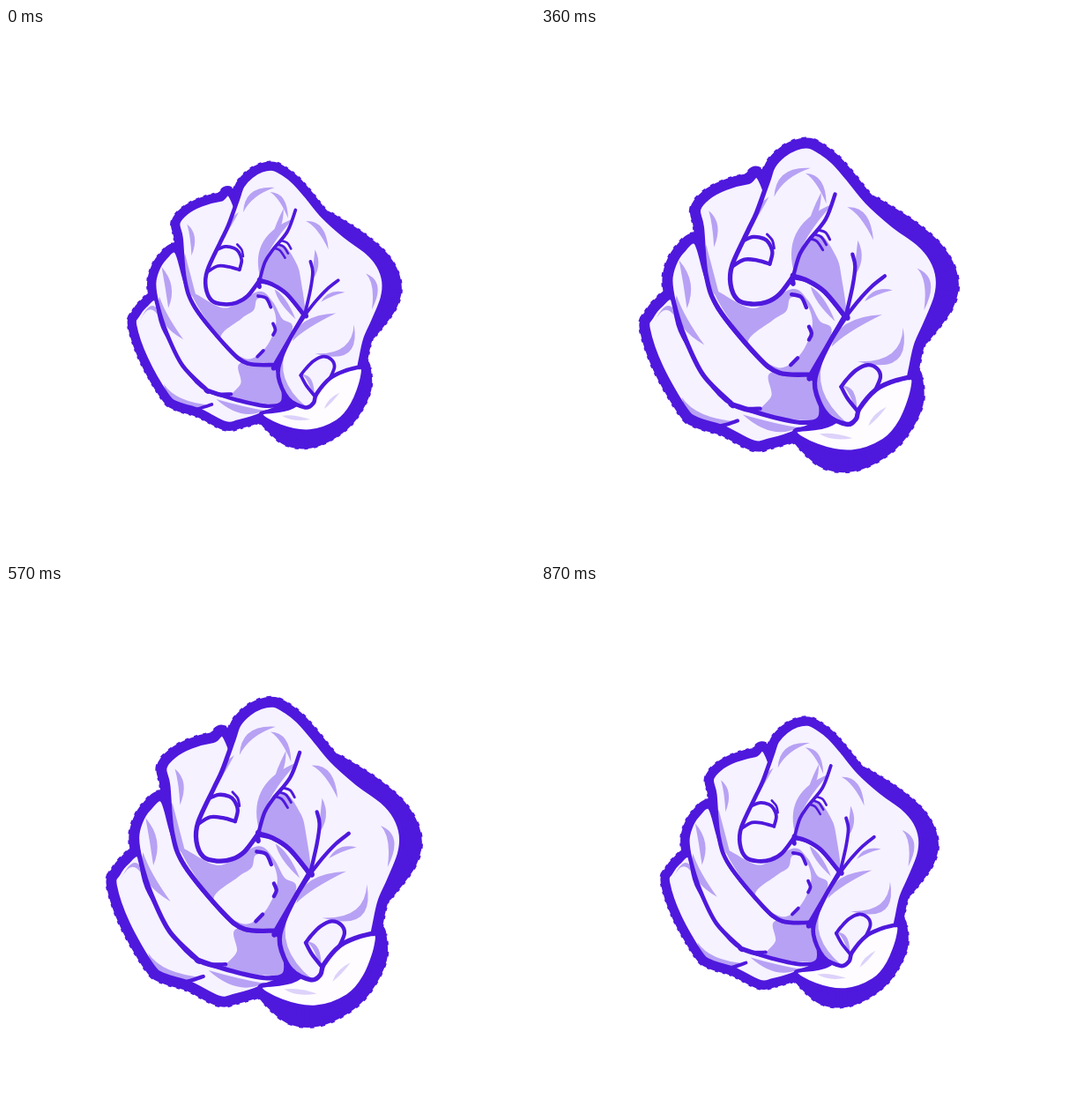
Write an HTML page with a canvas that moves like this. It is 600 px wide and 600 px high and loops after 900 ms.

```html
<!DOCTYPE html>
<html lang="en">
<head>
<meta charset="utf-8">
<title>Pulsing hand</title>
<style>
html, body { margin: 0; width: 100%; height: 100%; overflow: hidden; background: #fff; }
canvas { display: block; }
</style>
</head>
<body>
<canvas id="stage" width="600" height="600"></canvas>
<script>
const ctx = document.getElementById('stage').getContext('2d');
const INK = '#4f18dd', SKIN = '#f6f2ff', SHADE = '#b7a1f4', PALM = '#fefcff', FAINT = '#ddd2fa';
const LOOP = 900, STEP = 30, GROWTH = 0.206, DRAWN_SCALE = 1.1785;
const CENTER = { x: 297, y: 315 };

const points = text => text.trim().split(/\s+/).map(p => p.split(',').map(Number));

// Catmull-Rom spline; a doubled point makes a corner.
function curve(text, closed) {
  const p = points(text), n = p.length, path = new Path2D();
  const at = i => p[closed ? (i + n) % n : Math.max(0, Math.min(n - 1, i))];
  path.moveTo(...p[0]);
  for (let i = 0; i < (closed ? n : n - 1); i++) {
    const a = at(i - 1), b = at(i), c = at(i + 1), d = at(i + 2);
    path.bezierCurveTo(b[0] + (c[0] - a[0]) / 6, b[1] + (c[1] - a[1]) / 6,
      c[0] - (d[0] - b[0]) / 6, c[1] - (d[1] - b[1]) / 6, ...c);
  }
  return path;
}
const loop = text => curve(text, true);

// Brush mark with two sharp tips, bent through its middle point.
function leaf(text) {
  const [a, m, b] = points(text), path = new Path2D();
  const dx = (b[0] - a[0]) * 0.15, dy = (b[1] - a[1]) * 0.15;
  const cx = 2 * m[0] - (a[0] + b[0]) / 2, cy = 2 * m[1] - (a[1] + b[1]) / 2;
  path.moveTo(...a);
  path.quadraticCurveTo(cx - dy, cy + dx, ...b);
  path.quadraticCurveTo(cx + dy, cy - dx, ...a);
  return path;
}

// Back to front. Each part is filled, shaded inside its outline, then inked.
const parts = [
  { // little finger
    outline: loop(`148,307 133,315 123,328 119,341 134,385 162,434 177,446 206,455 240,472 258,470
      289,460 316,442 216,428 160,350`),
    shades: ['126,335 144,318 160,350', '158,420 180,444 222,448', '228,440 262,454 292,455'].map(leaf),
    lines: [curve('190,456 207,452 222,447')]
  },
  { // ring finger
    outline: loop(`174,242 158,253 149,268 145,286 149,312 161,350 183,395 216,428 216,428 256,441
      297,449 318,440 306,394 270,392 244,372 200,318 186,280`),
    shades: [loop('260,392 308,392 325,442 250,440 261,418'),
      ...['152,303 160,332 184,360', '155,263 164,290 164,318'].map(leaf)],
    lines: [curve('216,429 230,433 248,433')]
  },
  { // middle finger and fist
    outline: loop(`250,174 234,173 208,180 188,191 177,205 181,225 186,280 200,318 244,372 270,392
      306,394 306,394 345,327 345,327 322,299 302,286 284,282 284,282`),
    shades: [loop('196,300 240,318 284,296 303,309 316,332 330,345 308,394 270,392 240,368'),
      ...['189,206 196,224 195,248', '186,245 190,280 203,310', '306,293 318,310 334,333'].map(leaf)],
    lights: [loop('234,358 262,332 278,321 283,306 299,309 308,337 294,371 268,386')],
    lines: ['284,302 295,305 301,317', '304,339 307,347 304,354', '291,375 283,383'].map(t => curve(t))
  },
  { // heel of the hand
    outline: loop('288,459 330,450 385,408 420,396 423,412 410,447 390,470 353,483 313,476'),
    color: PALM, tint: FAINT,
    shades: ['316,462 333,465 354,467', '372,453 381,442 393,431'].map(leaf)
  },
  { // index finger and thumb
    outline: loop(`257,172 263,155 275,142 289,134 304,132 318,139 332,150 348,168 371,196 400,222
      430,244 445,262 452,283 450,305 438,335 427,360 421,387 419,397 419,397 400,402 380,412 362,433
      358,445 347,451 324,439 311,410 315,385 330,353 346,328 346,328 322,299 302,286 286,281 286,281
      270,302 255,311 238,313 222,308 214,290 216,268 234,229 244,208`),
    shades: [loop('288,282 303,243 318,234 335,258 341,280 346,328 322,299'),
      ...['264,190 278,167 306,157', '300,163 315,174 324,198', '286,274 297,232 332,198',
        '302,226 311,208 318,185', '239,222 246,206 258,190', '262,306 275,297 284,280',
        '348,202 366,213 378,240', '354,284 361,262 360,240', '428,272 440,290 436,320',
        '412,340 401,374 360,379', '368,310 382,300 400,297', '330,362 350,340 388,325',
        '322,372 314,414 348,450', '342,407 353,416 359,440'].map(leaf)],
    lines: ['286,281 293,257 303,241 323,216 334,187',
      '229,240 240,236 252,238 258,243 262,254 259,267', '216,270 230,262 245,263 259,267',
      '341,408 347,400 358,389 371,383 382,387 386,397 380,412', '341,408 348,421 359,435',
      '354,256 357,270 354,293 346,328', '391,281 376,293 361,309 346,328'].map(t => curve(t)),
  }
];

// Heavy shadow on the right and below.
const shadows = ['375,203 415,228 446,255 461,285 456,312 430,347',
  '420,398 421,425 404,458 382,478 353,491 325,488 302,468'].map(t => curve(t));

const wrinkles = [curve('256,233 262,240 264,249')];
for (let i = 0; i < 3; i++)
  wrinkles.push(curve(`${305 + 5 * i},${238 - 5 * i} ${313 + 5 * i},${241 - 5 * i} ${320 + 4 * i},${251 - 6 * i}`));

function ink(path, width) {
  ctx.lineWidth = width;
  ctx.stroke(path);
}

// Solid band plus a dashed, wider one that frays the edge.
function halo(path, width) {
  ink(path, width);
  ctx.lineCap = 'butt';
  ctx.setLineDash([4, 6]);
  ink(path, width + 2);
  ctx.setLineDash([]);
  ctx.lineCap = 'round';
}

function drawPart({ outline, shades, lights = [], lines = [], color = SKIN, tint = SHADE }) {
  const paint = (style, paths) => {
    ctx.fillStyle = style;
    paths.forEach(path => ctx.fill(path));
  };
  ctx.save();
  ctx.clip(outline);
  paint(color, [outline]);
  paint(tint, shades);
  paint(color, lights);
  ctx.restore();
  ink(outline, 5.4);
  lines.forEach(path => ink(path, 4.4));
}

function frame(now) {
  const t = Math.floor(now % LOOP / STEP) * STEP;
  const pulse = 1 - Math.abs(t / (LOOP / 2) - 1);
  const s = (1 + GROWTH * pulse) / DRAWN_SCALE;
  ctx.setTransform(1, 0, 0, 1, 0, 0);
  ctx.clearRect(0, 0, 600, 600);
  ctx.setTransform(s, 0, 0, s, CENTER.x * (1 - s), CENTER.y * (1 - s));
  ctx.lineCap = ctx.lineJoin = 'round';
  ctx.strokeStyle = INK;
  parts.forEach(part => halo(part.outline, 19));
  shadows.forEach(path => halo(path, 29));
  parts.forEach(drawPart);
  wrinkles.forEach(path => ink(path, 3));
}

const start = performance.now();
function tick() {
  frame(performance.now() - start);
  requestAnimationFrame(tick);
}
tick();
</script>
</body>
</html>
```
